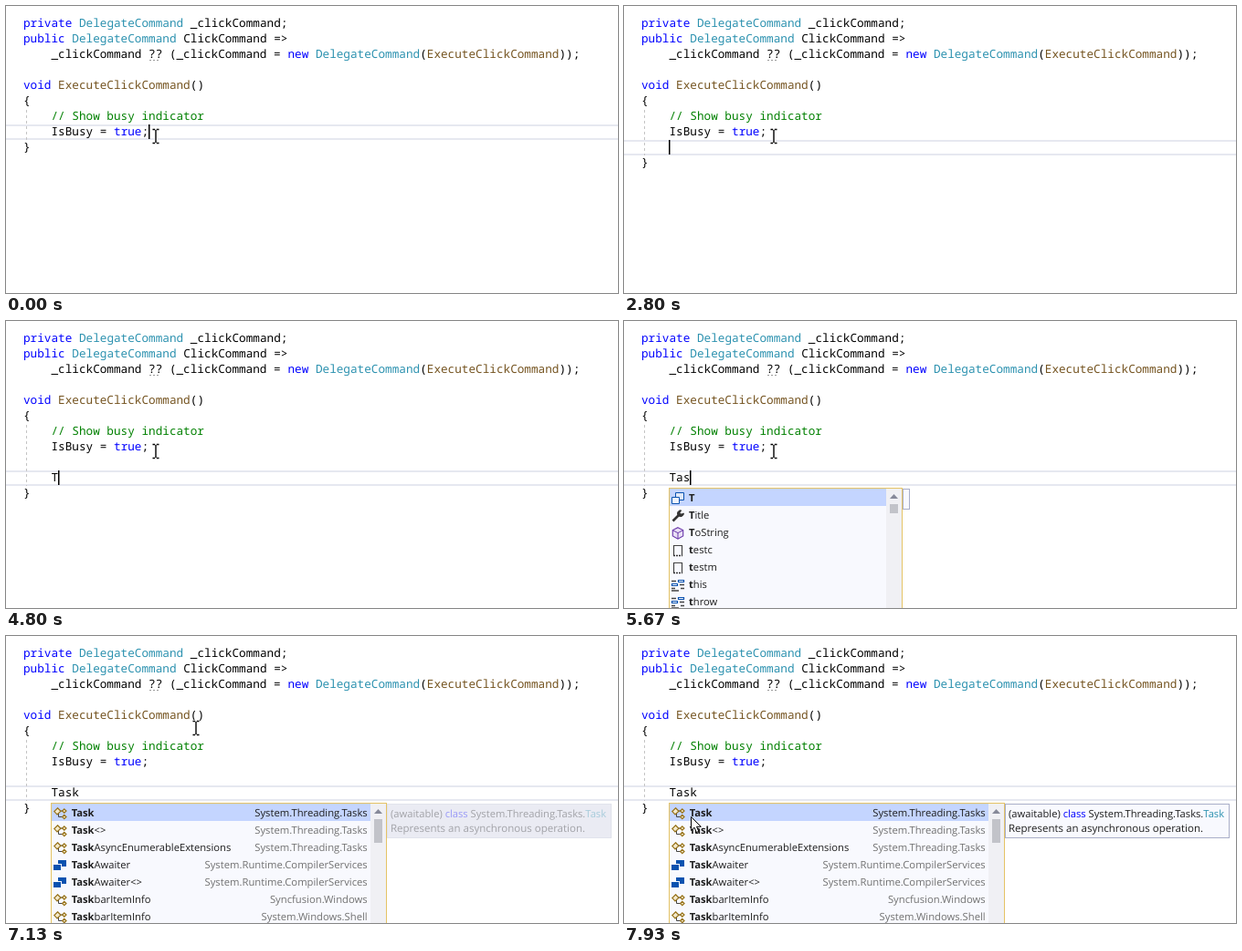
Recreate the animation shown at these times as an HTML page with a canvas. Size 670 by 315 pixels, loop 8 s.

```html
<!DOCTYPE html>
<html lang="en">
<head>
<meta charset="utf-8">
<title>Code completion</title>
<style>
html, body { margin: 0; width: 100%; height: 100%; overflow: hidden; background: #fff; }
canvas { display: block; }
</style>
</head>
<body>
<canvas id="stage" width="670" height="315"></canvas>
<script>
const ctx = document.getElementById('stage').getContext('2d');
const LOOP = 8000, LEFT = 19, CHAR = 7.617, LINE = 17, ROW = 19;
const MONO = '12.695px "Noto Sans Mono", monospace';
const ui = (size, bold = '') => `${bold} ${size}px "Open Sans", "Noto Sans", sans-serif`;
const BLACK = '#000', BLUE = '#0000ff', TYPE = '#2b91af', METHOD = '#74531f', GREEN = '#008000';
const GOLD = '#e5c365', PANEL = '#f8f9fe', ICON_BLUE = '#0a52b0', ICON_GOLD = '#967117';

// each code line is a list of [column, text, colour]
const CODE = [
  [[0, 'private', BLUE], [8, 'DelegateCommand', TYPE], [24, '_clickCommand;']],
  [[0, 'public', BLUE], [7, 'DelegateCommand', TYPE], [23, 'ClickCommand =>']],
  [[4, '_clickCommand ?? (_clickCommand ='], [38, 'new', BLUE], [42, 'DelegateCommand', TYPE],
   [57, '('], [58, 'ExecuteClickCommand', METHOD], [77, '));']],
  [],
  [[0, 'void', BLUE], [5, 'ExecuteClickCommand', METHOD], [24, '()']],
  [[0, '{']],
  [[4, '// Show busy indicator', GREEN]],
  [[4, 'IsBusy ='], [13, 'true', BLUE], [17, ';']]
];

// icon, matched part, rest, namespace
const SHORT_LIST = [
  ['param', 'T', ''], ['wrench', 'T', 'itle'], ['cube', 'T', 'oString'], ['snippet', 't', 'estc'],
  ['snippet', 't', 'estm'], ['keyword', 't', 'his'], ['keyword', 't', 'hrow']
];
const TASK_LIST = [
  ['class', 'Task', '', 'System.Threading.Tasks'],
  ['class', 'Task', '<>', 'System.Threading.Tasks'],
  ['class', 'Task', 'AsyncEnumerableExtensions', 'System.Threading.Tasks'],
  ['struct', 'Task', 'Awaiter', 'System.Runtime.CompilerServices'],
  ['struct', 'Task', 'Awaiter<>', 'System.Runtime.CompilerServices'],
  ['class', 'Task', 'barItemInfo', 'Syncfusion.Windows'],
  ['class', 'Task', 'barItemInfo', 'System.Windows.Shell']
];

// [time, value...] steps that hold until the next one
const CARET = [[0, 1], [130, 0], [670, 1], [1200, 0], [1800, 1], [2330, 0], [2800, 1],
  [3400, 0], [4000, 1], [4600, 0], [4800, 1], [6730, 0]];
const TYPED = [[0, ''], [4800, 'T'], [5670, 'Tas'], [6270, 'Task']];
const POINTER = [[0, 164, 143], [6930, 172, 134], [7000, 188, 117], [7070, 203, 104],
  [7130, 208, 101], [7200, 190, 157], [7400, 150, 190], [7470, 112, 208], [7530, 82, 221],
  [7600, 64, 219], [7670, 59, 211], [7800, 66, 202], [7930, 73, 198]];
const FADE = [[0, 0], [7070, 0.1], [7130, 0.35], [7200, 0.7], [7400, 1]];

function at(steps, t) {
  let now = steps[0];
  for (const s of steps) if (s[0] <= t) now = s;
  return now.slice(1);
}

function box(x, y, w, h, fill, edge) {
  ctx.fillStyle = edge || fill;
  ctx.fillRect(x, y, w, h);
  if (edge) {
    ctx.fillStyle = fill;
    ctx.fillRect(x + 1, y + 1, w - 2, h - 2);
  }
}

function text(s, x, y, color, font, align = 'left') {
  ctx.font = font;
  ctx.textAlign = align;
  ctx.fillStyle = color;
  ctx.fillText(s, x, y);
  return x + ctx.measureText(s).width;
}

function path(d, stroke, width = 1, fill) {
  const p = new Path2D(d);
  if (fill) { ctx.fillStyle = fill; ctx.fill(p); }
  if (stroke) { ctx.strokeStyle = stroke; ctx.lineWidth = width; ctx.stroke(p); }
}

function code(col, row, s, color = BLACK) {
  text(s, LEFT + col * CHAR, 23 + row * LINE, color, MONO);
}

// icons are drawn in a 14 by 14 cell
const ICONS = {
  param() {
    path('M4.5 .5h9v8h-9z', ICON_BLUE, 1, '#dfe8f8');
    path('M.5 5.5h8v7h-8z', ICON_BLUE, 1, '#eef3fd');
  },
  wrench() {
    path('M1.5 12.5L8 6', '#333', 2.6);
    path('M10.6 .9A3.4 3.4 0 1 0 13.3 4L10.8 5.2L9 3.4Z', '#333', 1, '#333');
  },
  cube() {
    path('M7 .7L12.7 3.6V10L7 13.2L1.3 10V3.6Z', '#6936aa', 1.1, '#e9e0f5');
    path('M1.3 3.6L7 6.6L12.7 3.6M7 6.6V13.2', '#6936aa');
  },
  snippet() {
    path('M2.5 12V1.5H11.5V12', '#444', 1.2);
    ctx.setLineDash([2, 1]);
    path('M2 12.5H12', '#333', 1.4);
    ctx.setLineDash([]);
  },
  keyword() {
    path('M0 2.5H5M9 6.5H14M0 10.5H4M10 10.5H14M0 13H8', '#444', 1.3);
    path('M7.5 1.5h6v2h-6zM.5 5.5h6v2h-6z', ICON_BLUE, 1.2);
  },
  class() {
    path('M7 4H10M5.5 6.5V10.5H10', '#444');
    path('M4.5 .8L8 4.2L4 8L.8 4.6Z', ICON_GOLD, 1.2, '#f3e9cd');
    path('M11.8 1.8L14 4L11.8 6.2L9.6 4ZM11.8 8.3L14 10.5L11.8 12.7L9.6 10.5Z', ICON_GOLD, 1.2, '#f3e9cd');
  },
  struct() {
    box(5, 1, 9, 7, ICON_BLUE);
    box(0, 5, 9, 8, PANEL);
    box(0, 6, 8, 6, ICON_BLUE);
  }
};

function list(items, width, thumb, shift) {
  const x = 49, y = 183, bar = x + width - 18;
  box(x, y, width, 140, PANEL, GOLD);
  box(x + 1, y + 1, width - 19, ROW, '#c4d5ff');
  box(bar, y + 1, 17, 140, '#f0f0f4');
  path(`M${bar + 4} 195l4.5-5l4.5 5z`, null, 1, '#868999');
  box(bar + 4, 201, 9, thumb, '#c2c3c9');
  items.forEach(([icon, match, rest, space], i) => {
    const top = y + 1 + i * ROW, base = top + 14;
    ctx.save();
    ctx.translate(52, top + 4);
    ICONS[icon]();
    ctx.restore();
    const end = text(match, 71 + shift, base, '#1e1e1e', ui(11.2, 'bold'));
    text(rest, end, base, '#1e1e1e', ui(11.2));
    if (space) text(space, bar - 4 + shift, base, i ? '#717171' : '#1e1e1e', ui(11.25), 'right');
  });
}

function tooltip(alpha) {
  ctx.globalAlpha = alpha;
  box(417, 184, 246, 38, PANEL, '#a9aec8');
  const font = ui(11.2);
  let x = text('(awaitable) ', 421, 199, '#1e1e1e', font);
  x = text('class', x, 199, BLUE, font);
  x = text(' System.Threading.Tasks.', x, 199, '#1e1e1e', font);
  text('Task', x, 199, TYPE, font);
  text('Represents an asynchronous operation.', 421, 215, '#1e1e1e', ui(11.5));
  ctx.globalAlpha = 1;
}

function pointer(x, y, arrow) {
  ctx.save();
  ctx.translate(x, y);
  if (arrow) {
    path('M.5 .5V15.5L4 12.2L6.4 17.5L8.8 16.4L6.5 11.3H11.3Z', BLACK, 1, '#fff');
  } else {
    const beam = 'M-3.5-7.5H-.8M.8-7.5H3.5M0-7V7M-3.5 7.5H-.8M.8 7.5H3.5';
    path(beam, '#fff', 3);
    path(beam, BLACK, 1.4);
  }
  ctx.restore();
}

function draw(t) {
  const extra = t < 2800 ? 0 : t < 2930 ? 1 : 2;
  const top = 130 + extra * LINE;
  const [typed] = at(TYPED, t);
  box(0, 0, 670, 315, '#fff');
  box(0, top, 670, 2, '#e6e8f0');
  box(0, top + 15, 670, 2, '#e6e8f0');

  ctx.setLineDash([3, 3]);
  path(`M22.5 114V${top + 17}`, '#c4c4c4');
  ctx.setLineDash([]);

  CODE.forEach((line, row) => line.forEach(([col, s, color]) => code(col, row, s, color)));
  for (const x of [157, 161, 165]) box(x, 59, 2, 1, '#999');
  code(0, 8 + extra, '}');
  code(4, 7 + extra, typed);

  if (at(CARET, t)[0]) {
    const col = extra ? 4 + typed.length : 18;
    box(Math.round(LEFT + col * CHAR), top, 1.5, 16, BLACK);
  }
  if (t >= 6400) list(TASK_LIST, 368, 26, t < 6730 ? 0 : 0.7);
  else if (t >= 5670) {
    box(305, 184, 8, 23, PANEL, '#a9aec8');
    list(SHORT_LIST, 256, 10, 0);
  }
  const [alpha] = at(FADE, t);
  if (alpha) tooltip(alpha);
  pointer(...at(POINTER, t), t >= 7400);
}

ctx.textRendering = 'geometricPrecision';
function frame() {
  draw(performance.now() % LOOP);
  requestAnimationFrame(frame);
}
frame();
</script>
</body>
</html>
```
